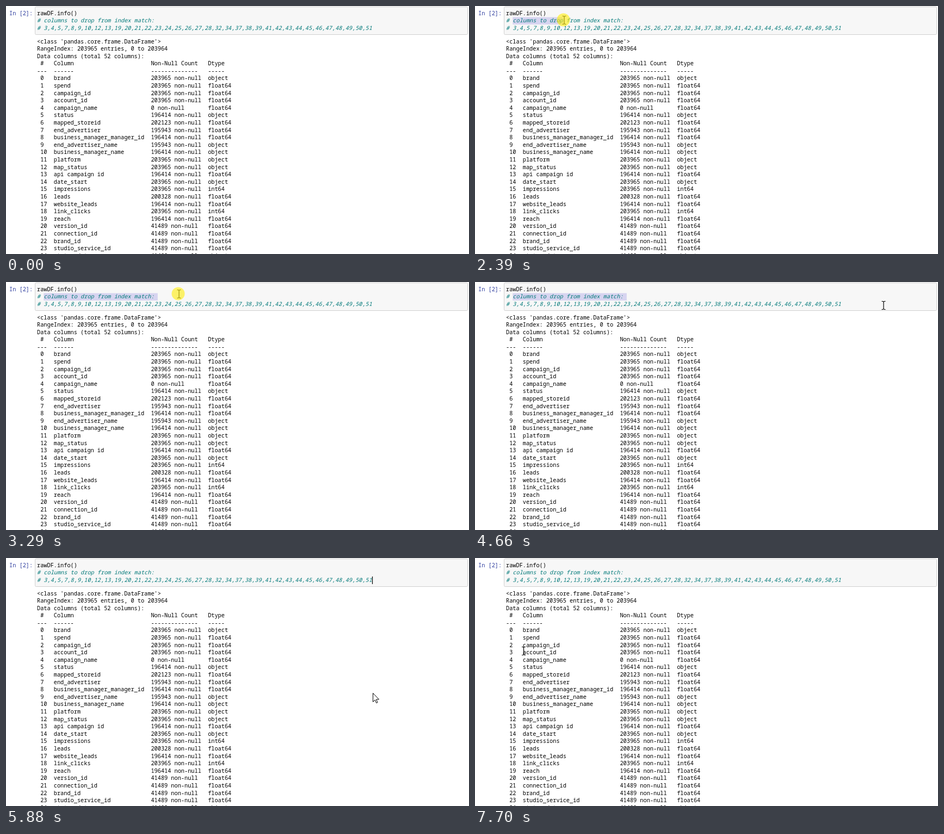
An HTML page that plays this animation: 851x456 px, repeating every 8 s.

```html
<!DOCTYPE html>
<html lang="en">
<head>
<meta charset="utf-8">
<title>Notebook cell</title>
<style>
html, body { margin: 0; width: 100%; height: 100%; overflow: hidden; background: #fff; }
svg { display: block; width: 100%; height: 100%; }
text { font: 10.27px "Noto Sans Mono", "DejaVu Sans Mono", monospace; white-space: pre; fill: #000; }
.prompt { fill: #303f9f; }
.comment { fill: #007979; font-style: italic; }
#marks rect { fill: #d7d4f0; }
</style>
</head>
<body>
<svg viewBox="0 0 851 456">
  <rect x="53.5" y="1.5" width="795" height="51" rx="2" fill="#f7f7f7" stroke="#cfcfcf"/>
  <g id="marks"><rect id="upper" y="7" height="13.5"/><rect id="lower" y="20.5" height="13.5"/></g>
  <g id="lines"></g>
  <path id="caret" d="M673.5 34V48" stroke="#000" stroke-width="1.2"/>
  <path id="beam" d="M-3.5 -7.5H-1.5L0 -6.5L1.5 -7.5H3.5M0 -6.5V6.5M-3.5 7.5H-1.5L0 6.5L1.5 7.5H3.5" fill="none" stroke="#000" stroke-width="1.2"/>
  <path id="arrow" d="M.5 .5V16.5L4.2 13L6.7 18.6L9 17.6L6.5 12H11.5Z" fill="#fff" stroke="#000"/>
  <circle id="press" r="12" fill="#ffee10" fill-opacity=".62"/>
</svg>
<script>
const LOOP = 8000, STEP = 70, BLINK = 530;
const DRAG = 1980, DROP = 3430, CLICK = 4790, RELEASE = 4920;
const LEFT = 57, RIGHT = 844, CHAR = 6.162, LINE = 13.594, SPLIT = 20.5;
const $ = id => document.getElementById(id);
const column = n => LEFT + n * CHAR;

function addText(str, x, y, cls = "") {
  const el = document.createElementNS("http://www.w3.org/2000/svg", "text");
  el.setAttribute("x", x);
  el.setAttribute("y", y);
  el.setAttribute("class", cls);
  el.textContent = str;
  $("lines").append(el);
}

addText("In [2]:", 6, 17, "prompt");
addText("rawDF.info()", LEFT, 17);
addText("# columns to drop from index match:", LEFT, 30, "comment");
addText("# 3,4,5,7,8,9,10,12,13,19,20,21,22,23,24,25,26,27,28,32,34,37,38,39,41,42,43,44,45,46,47,48,49,50,51", LEFT, 44, "comment");

// name, count key, type key
const counts = { a: "203965", b: "196414", c: "41489", d: "195943", e: "202123", f: "200328", z: "0" };
const types = { o: "object", f: "float64", i: "int64" };
const fields = `brand|a|o
spend|a|f
campaign_id|a|f
account_id|a|f
campaign_name|z|f
status|b|o
mapped_storeid|e|f
end_advertiser|d|f
business_manager_manager_id|b|f
end_advertiser_name|d|o
business_manager_name|b|o
platform|a|o
map_status|a|o
api campaign id|b|f
date_start|a|o
impressions|a|i
leads|f|f
website_leads|b|f
link_clicks|a|i
reach|b|f
version_id|c|f
connection_id|c|f
brand_id|c|f
studio_service_id|c|f
status_date|c|o`.split("\n").map(s => s.split("|"));

const row = (num, name, count, type) =>
  num.padEnd(5) + name.padEnd(29) + count.padEnd(17) + type;

[
  "<class 'pandas.core.frame.DataFrame'>",
  "RangeIndex: 203965 entries, 0 to 203964",
  "Data columns (total 52 columns):",
  row(" #", "Column", "Non-Null Count", "Dtype"),
  row("---", "------", "-".repeat(14), "-----"),
  ...fields.map(([name, c, t], i) => row(" " + i, name, counts[c] + " non-null", types[t]))
].forEach((s, i) => addText(s, LEFT, Math.round(68.52 + i * LINE)));

// pointer moves; bow bends the path sideways
const origin = { x: 708, y: 457 };
const moves = [
  { from: 410, to: 1040, x: 99.5, y: 31 },
  { from: 1240, to: 1380, x: 73.5, y: 37 },
  { from: 1580, to: 1650, x: 72, y: 27 },
  { from: DRAG, to: 2390, x: 164, y: 26 },
  { from: 2460, to: 2740, x: 247, y: 19 },
  { from: 2810, to: 3020, x: 312.5, y: 19 },
  { from: 3220, to: 3290, x: 318, y: 22 },
  { from: 3360, to: DROP, x: 321, y: 27 },
  { from: 3780, to: 4260, x: 756, y: 46, bow: 23 },
  { from: 4660, to: 4660, x: 751, y: 43 },
  { from: 5250, to: 5880, x: 674, y: 248, bow: 40 },
  { from: 5950, to: 6020, x: 630, y: 266 },
  { from: 6090, to: 6870, x: 146, y: 176, bow: 57 },
  { from: 6940, to: 7290, x: 105, y: 173 },
  { from: 7430, to: 7700, x: 89.5, y: 171 }
];

// share of a move done at time t, in even steps with a soft stop
function progress({ from, to }, t) {
  const n = Math.round((to - from) / STEP) + 1;
  const gap = (to - from) / (n - 1) || STEP;
  const k = Math.min(n, Math.floor((t - from) / gap + 0.1) + 1);
  const u = k / n;
  return u * (1.5 - 0.5 * u);
}

function pointer(t) {
  let p = origin;
  for (const m of moves) {
    if (t < m.from) break;
    const u = progress(m, t), dx = m.x - p.x, dy = m.y - p.y;
    const bend = (m.bow || 0) * 4 * u * (1 - u) / (Math.hypot(dx, dy) || 1);
    const side = dx > 0 ? 1 : -1;
    const nx = m.bow ? -dy * side : 0, ny = m.bow ? dx * side : 0;
    const turn = Math.abs(dy) > Math.abs(dx) ? 1 : ny < 0 ? -1 : 1;
    p = { x: p.x + dx * u + nx * bend * turn, y: p.y + dy * u + ny * bend * turn };
  }
  return p;
}

function show(el, on) { el.style.display = on ? "" : "none"; }

function place(el, on, x, y) {
  show(el, on);
  el.setAttribute("transform", `translate(${x} ${y})`);
}

function span(el, from, to) {
  el.setAttribute("x", from);
  el.setAttribute("width", Math.max(0, to - from));
}

// the drag starts in line two and slips into line one for a while
function select(t) {
  const { x, y } = pointer(Math.min(t, DROP));
  const above = y < SPLIT, anchor = column(2);
  const end = column(Math.min(36, Math.round((x - LEFT) / CHAR)));
  span($("upper"), column(12), above ? RIGHT : 0);
  span($("lower"), above ? LEFT : anchor, above ? anchor : end);
  show($("marks"), t >= DRAG && t < CLICK);
}

function draw(t) {
  const { x, y } = pointer(t);
  const overText = y < 53 || (x < 415 && y > 58);
  const down = (t >= DRAG && t < DROP) || (t >= CLICK && t < RELEASE);
  place($("beam"), overText && t >= moves[0].from, x, y);
  place($("arrow"), !overText, x, y);
  place($("press"), down, x - 1.5, y - 0.5);
  select(t);
  show($("caret"), t >= CLICK && Math.floor((t - CLICK) / BLINK) % 2 === 0);
}

const begin = performance.now();
function tick() {
  draw((performance.now() - begin) % LOOP);
  requestAnimationFrame(tick);
}
draw(0);
requestAnimationFrame(tick);
</script>
</body>
</html>
```
